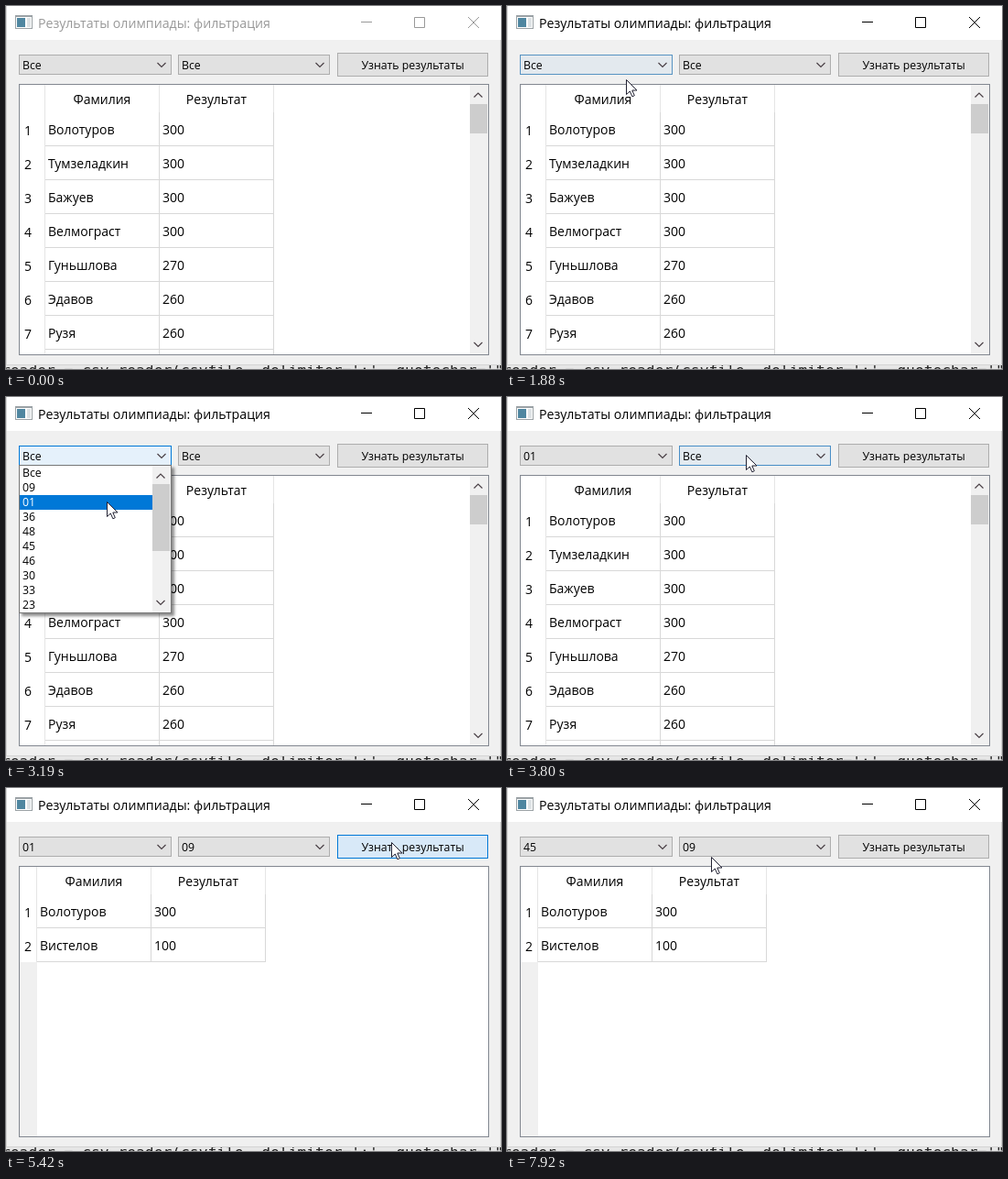
An HTML page that plays this animation: 541 px wide and 396 px high, repeating every 8000 ms.

```html
<!DOCTYPE html>
<html lang="ru">
<head>
<meta charset="utf-8">
<title>Результаты олимпиады</title>
<style>
  html, body { margin: 0; width: 100%; height: 100%; overflow: hidden; background: #e6e6e6; }
  #stage { position: relative; width: 541px; height: 396px; overflow: hidden;
    font: 14px "Open Sans", "Noto Sans", sans-serif; color: #000; }
  #stage div, #stage svg { position: absolute; box-sizing: border-box; white-space: pre; }
  #code { left: -5px; top: 387px; font: 16.3px/22px "DejaVu Sans Mono", monospace; color: #222; }
  #window { width: 541px; height: 392px; background: #f0f0f0; border: solid #d4d4d4; border-width: 0 1px 1px; }
  #bar { width: 541px; height: 37px; background: #fff; border-left: 1px solid #d8d8d8; }
  #title { left: 35px; top: 0; line-height: 37px; font-size: 14.2px; }
  #glyphs { left: 0; top: 0; }
  .idle #title { color: #999; }
  .idle #glyphs { stroke: #999; }

  .field { --h: 0; height: 22px; top: 53px; padding-left: 3px; font-size: 12.3px; line-height: 21px;
    background: color-mix(in srgb, #e5f1fb calc(var(--h) * 100%), #e1e1e1);
    border: 1px solid color-mix(in srgb, #0078d7 calc(var(--h) * 100%), #adadad); }
  .field svg { right: 5px; top: 7px; }
  #button { left: 362px; top: 51px; width: 165px; height: 26px; padding: 0; line-height: 25px; text-align: center;
    background: color-mix(in srgb, #d8e9f8 calc(var(--h) * 100%), #e1e1e1); }
  #c1 { left: 14px; width: 167px; }
  #c2 { left: 188px; width: 166px; }

  #frame { left: 14px; top: 85px; width: 514px; height: 296px; background: #fff;
    border: 1px solid #828790; overflow: hidden; }
  .table { inset: 0; }
  .table .cell { height: 37px; line-height: 38px; padding-left: 3px; width: 125px;
    border: solid #d8d8d8; border-width: 0 1px 1px 0; }
  .table .head { height: 30px; line-height: 31px; text-align: center; padding: 0;
    border-color: #e5e5e5; border-bottom: 0; }
  .table .num { padding-left: 5px; border-bottom: 0; line-height: 39px; border-color: #e5e5e5; }
  .gutter { background: #f0f0f0; left: 0; bottom: 0; }
  .track { background: #f0f0f0; right: 0; top: 0; bottom: 0; width: 20px; }
  .track svg { left: 4px; top: 8px; }
  .track svg + svg { top: auto; bottom: 7px; }
  .thumb { background: #cdcdcd; left: 0; width: 19px; }

  .popup { top: 74px; background: #fff; border: 1px solid #777; overflow: hidden;
    box-shadow: 3px 3px 3px rgba(0, 0, 0, .45); font-size: 12.3px; }
  .popup.rolling { box-shadow: none; border-top-color: #fff; }
  .list { left: 0; right: 0; bottom: 0; }
  .item { left: 0; width: 100%; height: 16px; line-height: 16px; padding-left: 3px; }
  .scrolls .item { width: 145px; }
  .item.on { background: #0078d7; color: #fff; }

  #ring { width: 30px; height: 30px; border-radius: 50%; background: rgba(245, 240, 60, .68); }
  #cursor { overflow: visible; }
</style>
</head>
<body>
<div id="stage">
  <div id="code">reader = csv.reader(csvfile, delimiter=';', quotechar='"')</div>
  <div id="window"></div>
  <div id="bar"></div>
  <svg id="glyphs" width="541" height="37" fill="none" stroke="#000">
    <g stroke="none">
      <rect x="10" y="10" width="19" height="15" fill="#9aa1a5"/>
      <rect x="11" y="12" width="17" height="12" fill="#fff"/>
      <rect x="12" y="13" width="9" height="10" fill="#4f86a0"/>
      <rect x="23" y="13" width="4" height="10" fill="#dde2e4"/>
    </g>
    <path d="M388 17.5h12M446.5 12.5h11v11h-11zM505 12l12 12M517 12l-12 12"/>
  </svg>
  <div id="title">Результаты олимпиады: фильтрация</div>

  <div id="frame">
    <div class="table" id="full"></div>
    <div class="table" id="filtered"></div>
  </div>

  <div class="field" id="c1"></div>
  <div class="field" id="c2"></div>
  <div class="field" id="button">Узнать результаты</div>

  <div id="ring"></div>
  <svg id="cursor" width="13" height="20">
    <path d="M.5 .5V16.5L4.3 13L6.9 18.8L9.3 17.7L6.8 12H12Z" fill="#fff" stroke="#223"/>
  </svg>
</div>
<script>
const LOOP = 8000, STEP = 77.6;
const ROLL = 160, FADE = 300, PRESS = 160, REACT = 122;
const LIST_TOP = 75, ROW = 16;
const $ = id => document.getElementById(id);
const stage = $('stage');

function add(parent, cls, text = '', style = {}) {
  const el = document.createElement('div');
  el.className = cls;
  el.textContent = text;
  for (const k in style) el.style[k] = style[k] + 'px';
  parent.append(el);
  return el;
}

const chevron = d => `<svg width="10" height="7" fill="none" stroke="#4a4046" stroke-width="1.2"><path d="${d}"/></svg>`;
const UP = chevron('M.5 5.5L5 1L9.5 5.5'), DOWN = chevron('M.5 1L5 5.5L9.5 1');

function scrollbar(parent, top, height) {
  const track = add(parent, 'track');
  track.innerHTML = UP + DOWN;
  add(track, 'thumb', '', { top, height });
}

function fillTable(el, width, rows) {
  const second = width + 125;
  add(el, 'cell head', '', { left: 0, width });
  add(el, 'cell head', 'Фамилия', { left: width });
  add(el, 'cell head', 'Результат', { left: second });
  rows.forEach(([name, score], i) => {
    const top = 30 + 37 * i;
    add(el, 'cell num', i + 1, { left: 0, top, width });
    add(el, 'cell', name, { left: width, top });
    add(el, 'cell', score, { left: second, top });
  });
}

const people = [['Волотуров', 300], ['Тумзеладкин', 300], ['Бажуев', 300], ['Велмограст', 300],
  ['Гуньшлова', 270], ['Эдавов', 260], ['Рузя', 260], ['', '']];
fillTable($('full'), 28, people);
scrollbar($('full'), 21, 32);
fillTable($('filtered'), 19, [people[0], ['Вистелов', 100]]);
add($('filtered'), 'gutter', '', { top: 104, width: 19 });

function makeCombo(el, items) {
  const label = document.createTextNode(''), height = items.length * ROW;
  el.innerHTML = DOWN;
  el.prepend(label);
  const { left, width } = el.getBoundingClientRect();
  const popup = add(stage, 'popup', '', { left, width });
  const list = add(popup, 'list', '', { height });
  const rows = items.map((text, i) => add(list, 'item', text, { top: i * ROW }));
  if (items.length > 4) {
    popup.classList.add('scrolls');
    scrollbar(list, 20, 73);
  }
  return { el, items, label, height, popup, rows };
}
const school = makeCombo($('c1'), 'Все 09 01 36 48 45 46 30 33 23'.split(' '));
const grade = makeCombo($('c2'), 'Все 09 10 11'.split(' '));
const combos = [school, grade];
const fields = [school.el, grade.el, $('button')];
const boxes = new Map(fields.map(el => [el, el.getBoundingClientRect()]));
stage.append($('ring'), $('cursor'));

// The user's session: pointer moves and clicks with what they cause.
const moves = [{ start: 0, end: 1, x: 225, y: 420 }], clicks = [];
const move = (start, end, x, y) => moves.push({ start, end, x, y });
const click = (at, act) => clicks.push({ at, act });
const rowY = i => LIST_TOP + ROW * i + 7;
const open = combo => (state, t) => { state.open = combo; state.since = t; };
const pick = (combo, i) => state => { state.open = null; state.chosen.set(combo, i); };
const filter = state => { state.filtered = true; };

move(70, 850, 149, 58);
click(930, open(school));
move(1200, 1600, 118, rowY(0));
click(1600, pick(school, 0));
move(1790, 2200, 262, 62);
move(2300, 2640, 120, 64);
click(2780, open(school));
move(2960, 3180, 110, rowY(2));
click(3220, pick(school, 2));
move(3300, 3800, 261, 63);
click(3980, open(grade));
move(4270, 4500, 264, rowY(1));
click(4490, pick(grade, 1));
move(4650, 5080, 421, 59);
click(5080, filter);
move(5500, 6300, 138, 66);
click(6320, open(school));
move(6500, 6670, 136, rowY(0) + 8);
move(6700, 7140, 91, rowY(5));
click(7280, pick(school, 5));
move(7460, 7915, 223, 75);

const smooth = p => p * p * (3 - 2 * p);

function pointer(t) {
  const n = moves.findLastIndex(m => m.start <= Math.max(0, t));
  const to = moves[n], from = moves[n - 1] || to;
  const p = smooth(Math.max(0, Math.min(1, (t - to.start) / (to.end - to.start))));
  return [Math.round(from.x + (to.x - from.x) * p), Math.round(from.y + (to.y - from.y) * p)];
}

function stateAt(t) {
  const state = { open: null, since: 0, filtered: false, chosen: new Map(combos.map(c => [c, 0])) };
  for (const c of clicks) if (c.at + REACT <= t) c.act(state, c.at + REACT);
  return state;
}

function isHot(el, t) {
  const { open } = stateAt(t);
  if (open) return open.el === el;
  const [x, y] = pointer(t), b = boxes.get(el);
  return x >= b.left && x < b.right && y >= b.top && y < b.bottom;
}

// Highlight fades as the share of the last FADE ms spent over the field.
function glow(el, t) {
  const n = 12;
  let sum = 0;
  for (let i = 0; i < n; i++) sum += isHot(el, t - FADE * i / n);
  return sum / n;
}

function drawCombo(c, state, t, y) {
  const chosen = state.chosen.get(c), isOpen = state.open === c;
  c.label.data = c.items[chosen];
  c.popup.style.display = isOpen ? '' : 'none';
  if (!isOpen) return;
  const roll = Math.min(1, (t - state.since) / ROLL);
  c.popup.classList.toggle('rolling', roll < 1);
  c.popup.style.height = 2 + Math.round(c.height * roll) + 'px';
  const active = y >= LIST_TOP ? Math.floor((y - LIST_TOP - 1) / ROW) : chosen;
  c.rows.forEach((row, i) => row.classList.toggle('on', i === active));
}

function draw(now) {
  const t = Math.floor((now % LOOP + 8) / STEP) * STEP;
  const [x, y] = pointer(t), state = stateAt(t);
  stage.classList.toggle('idle', t < 150);
  for (const c of combos) drawCombo(c, state, t, y);
  for (const el of fields) el.style.setProperty('--h', glow(el, t));
  $('full').style.display = state.filtered ? 'none' : '';
  $('filtered').style.display = state.filtered ? '' : 'none';
  $('cursor').style.transform = `translate(${x}px, ${y}px)`;
  $('ring').style.transform = `translate(${x - 15}px, ${y - 14}px)`;
  $('ring').style.display = clicks.some(c => t >= c.at && t < c.at + PRESS) ? '' : 'none';
}

const start = performance.now();
function tick() {
  draw(performance.now() - start);
  requestAnimationFrame(tick);
}
tick();
</script>
</body>
</html>
```
